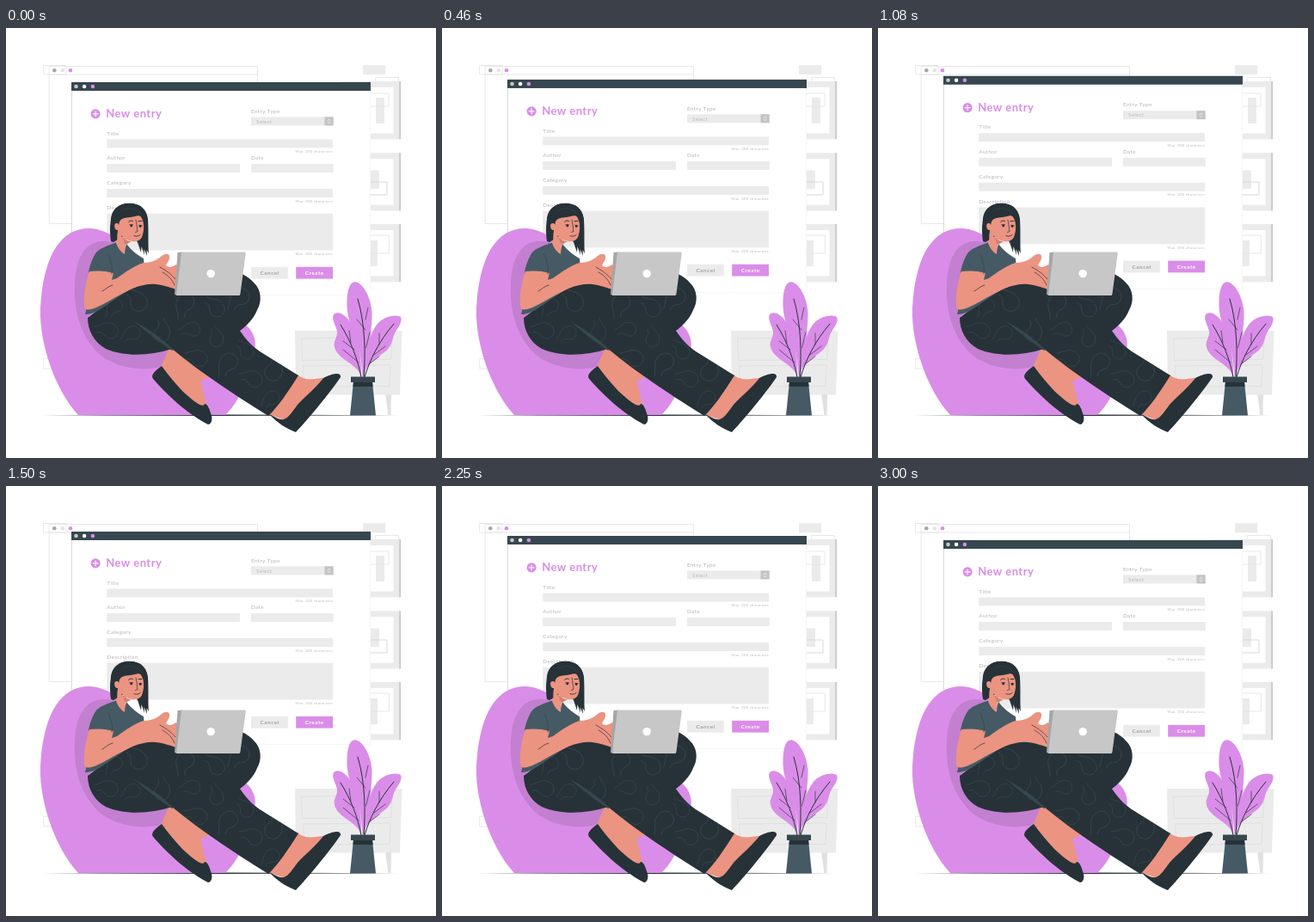
These frames come from a looping animation (500 by 500 pixels, 3040 ms). An HTML page with a canvas:

```html
<!DOCTYPE html>
<html lang="en">
<head>
<meta charset="utf-8">
<title>New entry</title>
<style>
html, body { margin: 0; width: 100%; height: 100%; overflow: hidden; background: #fff; }
canvas { display: block; width: 500px; height: 500px; }
</style>
</head>
<body>
<canvas id="stage"></canvas>
<script>
const LOOP = 3040, FPS = 24, STEPS = 72, RISE = 10;
const PURPLE = '#da8de8', DARK = '#263238', SLATE = '#37474f', STEEL = '#455a64';
const PALE = '#ebebeb', LINE = '#e3e3e3', GREY = '#c7c7c7', MID = '#a6a6a6', SKIN = '#eb9481';

const canvas = document.getElementById('stage');
const ctx = canvas.getContext('2d');
const dpr = window.devicePixelRatio || 1;
canvas.width = canvas.height = Math.round(500 * dpr);

function box(x, y, w, h, color) {
  ctx.fillStyle = color;
  ctx.fillRect(x, y, w, h);
}

function frame(x, y, w, h, color = LINE, width = 0.8) {
  ctx.strokeStyle = color;
  ctx.lineWidth = width;
  ctx.strokeRect(x, y, w, h);
}

function dot(x, y, r, color) {
  ctx.fillStyle = color;
  ctx.beginPath();
  ctx.arc(x, y, r, 0, 7);
  ctx.fill();
}

function fill(d, color) {
  ctx.fillStyle = color;
  ctx.fill(new Path2D(d));
}

function line(d, color, width) {
  ctx.strokeStyle = color;
  ctx.lineWidth = width;
  ctx.lineCap = ctx.lineJoin = 'round';
  ctx.stroke(new Path2D(d));
}

function text(s, x, y, size, color, { weight = 400, align = 'left', gap = 0.4 } = {}) {
  ctx.font = `${weight} ${size}px Lato, sans-serif`;
  ctx.letterSpacing = gap + 'px';
  ctx.textAlign = align;
  ctx.fillStyle = color;
  ctx.fillText(s, x, y);
}

function drawRoom() {
  frame(44, 43.5, 26, 10.5);
  frame(50.5, 44.5, 242, 183);
  line('M50.5 54H292.5', LINE, 0.8);
  dot(56.3, 49.2, 2.3, MID);
  dot(65.8, 49.2, 2.3, '#e4e4e4');
  dot(75, 49.2, 2.3, PURPLE);
  frame(44, 384.5, 26, 11.5);
  box(415, 43.2, 26.2, 11, PALE);
  frame(430, 57.5, 26.5, 12);

  for (const y of [62, 145.2, 228]) {
    box(390, y, 67.5, 67.3, PALE);
    box(457.2, y, 1.8, 67.3, GREY);
    box(396, y + 7, 54.5, 53.5, '#fff');
  }
  box(430, 81, 10, 30, PALE);
  frame(405, 76, 40, 15);
  box(418, 165.5, 16, 21.5, PALE);
  frame(405, 179, 38, 15, '#d0d0d0');
  box(418, 247, 14, 30, PALE);
  frame(405, 241, 40.5, 21);

  fill('M441 425H448L447.5 450H444.5Z', '#e0e0e0');
  fill('M336 352H460.5L458 426.5H337Z', PALE);
  line('M344 361L449 360L447.5 385.5L345 386.5ZM346 393L447 392L446 416.5L347 417Z', '#dadada', 0.7);
  fill('M41 450.2L249 449.6L457 450.2L249 450.9Z', DARK);
}

function field(label, x, y, w, h = 10) {
  text(label, x, y - 4.8, 6.3, '#b4b4b4');
  box(x, y, w, h, PALE);
}

function limit(y) {
  text('Max. 200 characters', 380, y, 4.2, '#b8b8b8', { align: 'right', gap: 0.32 });
}

function button(label, x, back, color) {
  box(x, 277.8, 42.8, 13.8, back);
  text(label, x + 21.6, 287, 6.4, color, { weight: 700, align: 'center', gap: 0.5 });
}

function drawWindow(dy) {
  ctx.save();
  ctx.translate(0, dy);
  box(76, 63, 348, 247.4, '#fff');
  line('M76.4 73V310.2', '#d4d4d4', 0.9);
  line('M76.4 310.4H423.7V73', '#efefef', 0.6);
  box(76, 63, 348, 10, SLATE);
  dot(81.5, 68, 2.3, GREY);
  dot(91.1, 68, 2.3, '#fff');
  dot(100.9, 68, 2.3, PURPLE);

  dot(104.1, 99.9, 5.6, PURPLE);
  line('M101.2 99.9H107M104.1 97V102.8', '#fff', 1.2);
  text('New entry', 116.2, 104.2, 13, PURPLE, { weight: 700, gap: 0.45 });

  field('Entry Type', 285, 103.4, 95.5, 10);
  text('Select', 291, 110.7, 6, '#b8b8b8');
  box(370.5, 103.4, 10.2, 10, '#c4c4c4');
  line('M374.2 107.6L375.6 106.2L377 107.6M374.2 109.4L375.6 110.8L377 109.4', '#fff', 0.8);

  field('Title', 117.3, 129.4, 262.7);
  limit(145.4);
  field('Author', 117.3, 158, 154.7);
  field('Date', 285, 158, 95.8);
  field('Category', 117.3, 187, 262.7);
  limit(202.6);
  field('Description', 117.3, 215.7, 262.7, 42.8);
  limit(264.1);

  button('Cancel', 285, PALE, '#a0a0a0');
  button('Create', 337.2, PURPLE, '#fff');
  ctx.restore();
}

function drawBag() {
  fill('M84 450C56 420 36 360 40.5 318C45 264 64 232 98 233C122 235 138 250 152 275L200 330L270 340C288 348 294 365 287 382C282 410 270 436 255 450Z', PURPLE);
  fill('M124 249C101 243 85 257 81 285C76 325 86 362 113 383C136 398 168 400 188 391L200 350L150 270Z', '#c37fd0');
}

// One leaf-like squiggle of the trouser print
function swirl(x, y, turn, size) {
  ctx.save();
  ctx.translate(x, y);
  ctx.rotate(turn);
  ctx.scale(size, size);
  line('M-14 3C-8 -1 -7 -9 2 -9C12 -9 13 3 6 6C0 9 -3 1 -9 7', SLATE, 0.7);
  ctx.restore();
}

function drawLegs() {
  fill('M190 372C186 380 183 387 180 394C194 418 212 436 226 440L233 437C230 428 229 419 226 411L239 404L204 371Z', SKIN);
  fill('M181 393C170 401 168 405 172 409C190 430 215 451 235 461C239 461 241 454 238 448C236 441 234 437 231 437C229 443 217 433 205 422C196 412 188 403 181 393Z', DARK);
  fill('M339 403C349 412 360 407 369 407L330 458L304 449Z', SKIN);
  fill('M306 449C314 453 319 456 323 455C329 453 333 446 339 438C348 428 361 418 369 407C378 402 390 399 389 406C377 424 352 454 337 470C326 466 314 458 306 449Z', DARK);

  const pants = 'M95 337C108 328 134 304 158 298C190 292 215 300 235 290C260 276 278 285 288 296C297 304 298 318 292 328C288 338 280 346 272 352C278 361 286 370 295 376L340 404C328 423 316 441 305 451C274 432 225 400 193 373C166 382 136 382 116 373C103 366 95 352 95 337Z';
  fill(pants, DARK);
  ctx.save();
  ctx.clip(new Path2D(pants));
  const rows = [
    [126, 325, -0.6], [118, 352, 0.5], [152, 317, 1.2], [146, 356, -0.2],
    [181, 353, 1.9], [208, 322, -0.9], [215, 351, 0.2], [243, 325, 1.1],
    [271, 315, -0.5], [244, 360, 1.7], [222, 384, 0.6], [258, 391, -0.7],
    [278, 375, 1.2], [286, 408, 0.6], [311, 397, 2.1], [308, 432, -0.4]
  ];
  rows.forEach(([x, y, turn], i) => swirl(x, y, turn, 1 + 0.12 * (i % 3)));
  ctx.restore();
  fill('M149 341C164 354 178 365 193 375L195 374C180 360 164 349 149 341Z', SLATE);
}

function drawBody() {
  fill('M129 249C117 254 107 256 103 264C99 271 97 278 96 284L102 292L92 333C102 333 112 326 120 320L162 292L160 268C153 264 146 259 140 251L137 262Z', STEEL);
  fill('M129 243L128 250C130 256 134 261 138 263L139 251L141 244Z', SKIN);

  fill('M97 283C92 297 90 312 91 324C92 329 98 328 105 325C125 316 143 302 160 299C172 296 183 299 198 304L201 279L198 275C194 277 190 280 186 276C188 272 191 269 190 265C189 262 185 262 181 265C176 270 168 273 160 273C150 276 140 283 129 291L123 293L125 285C115 282 106 282 97 283Z', SKIN);
  line('M112 306C116 304 119 300 124 299M179 278C186 282 191 285 197 292M182 284C189 288 193 292 196 299', DARK, 0.7);
  line('M119 264C123 273 124 279 123 286', SLATE, 0.8);
}

function drawHead() {
  fill('M122 248C120 232 120 211 135 205C150 201 163 207 165 222C166 239 165 252 166 262L163.5 258L164 265L160.5 257L161 264L157.5 254L157 261L153 249L142 239L125 249Z', DARK);
  fill('M130 224C136 219 145 217 155 217C161 223 161 233 159 240C158 246 153 249 147 248C141 247 137 244 134 241L138 252L129 252Z', SKIN);
  fill('M134 241C137 246 141 248 146 248L139 252Z', '#d27e6d');
  fill('M122 226C121 209 134 203 145 204C159 205 165 213 165 228L160 225C159 219 155 217 150 219C143 221 136 219 132 225C130 233 130 241 125 249L122 247Z', DARK);
  ctx.fillStyle = SKIN;
  ctx.beginPath();
  ctx.ellipse(129, 231, 2.8, 4, -0.2, 0, 7);
  ctx.fill();
  line('M134 213C142 208 149 208 157 216', SLATE, 0.6);
  line('M142.5 225.5C144 223.6 146 223.6 147.5 224.6M154 224.7L158 224.4', DARK, 1);
  line('M151 223C151.8 228 152.8 233 152.8 236.8L150.3 237.4', DARK, 0.7);
  line('M149 241.7C152 242.8 155 242 156.3 240.2', DARK, 0.8);
  dot(145.8, 229.7, 1.5, DARK);
  dot(156.2, 230.5, 1.4, DARK);
  line('M143.3 228.8L147.5 228.7M154.6 229.3L158.4 229.7', DARK, 0.6);
}

function drawLaptop() {
  fill('M199.5 261L205 260.5L200 311L196 310Z', MID);
  fill('M204 260.5H277.5Q279 260.5 278.8 262L272.4 309.5Q272.2 311 270.5 311H198Z', GREY);
  dot(238.2, 285.6, 4.7, '#fff');
}

function drawPlant() {
  fill('M414.5 405C414 385 410 368 403 350C398 339 396 328 396.5 317C397 304 400 295 406 295.3C414 296 424 311 425.5 330C426 350 420 385 417 405Z', PURPLE);
  fill('M415 404C417 382 421 359 431 345C438 336 452 332 459 336C462 342 454 350 451 357C449 363 449 370 440 377C431 384 420 390 415 404Z', PURPLE);
  fill('M413 405C408 390 386 386 382 371C380 364 386 359 385 353C384 346 378 339 381 333C387 328 396 334 402 345C409 358 414 385 413 405Z', PURPLE);
  line('M416 406C418 380 418 345 409 315M413 406C409 385 401 364 389 345M417 406C423 386 433 365 451 344', DARK, 1);
  line('M418 351L408 339M418 339L421 325M418.5 372L423 354M405 374L392 364M401 366L399 352M410 389L392 374M428 380L441 370M434 368L434 355M422 391L434 382', DARK, 0.65);
  fill('M404 411.5H426L430 450.5H400Z', STEEL);
  fill('M404 411.5H426L426.6 417H403.5Z', DARK);
  box(401, 405.5, 28, 6.5, SLATE);
}

function render(now) {
  // Held at 24 pictures a second; a few ms of slack absorb rounded delays
  const step = Math.floor((now % LOOP + 5) * FPS / 1000) % (STEPS + 1);
  const dy = -RISE * (1 - Math.abs(2 * step / STEPS - 1));
  ctx.setTransform(dpr, 0, 0, dpr, 0, 0);
  box(0, 0, 500, 500, '#fff');
  drawRoom();
  drawWindow(dy);
  drawBag();
  drawLegs();
  drawBody();
  drawHead();
  drawLaptop();
  drawPlant();
}

const start = performance.now();
function tick() {
  render(performance.now() - start);
  requestAnimationFrame(tick);
}
tick();
</script>
</body>
</html>
```
